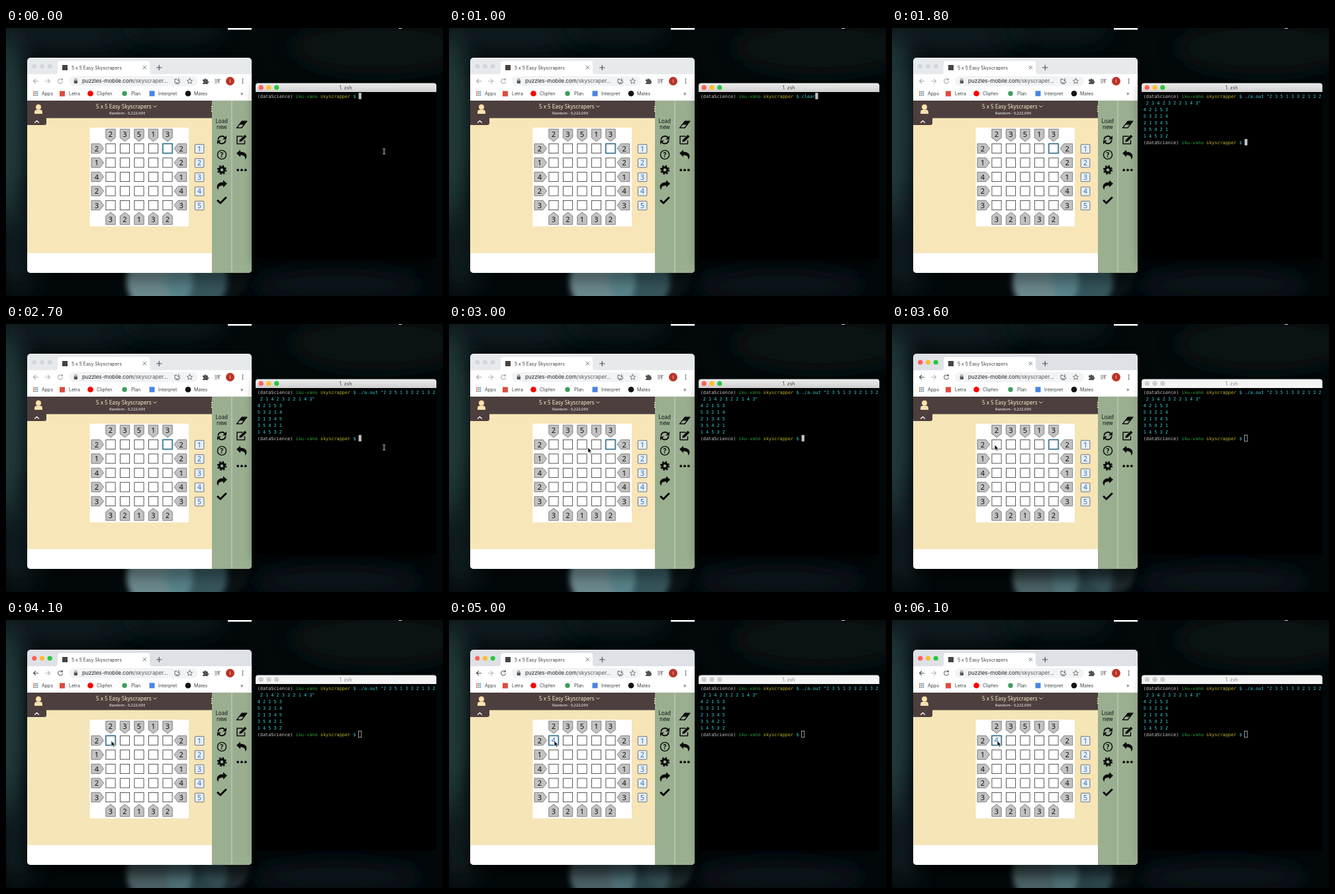
Animation, 660 px wide and 406 px high, one loop 8 s. Source, as an HTML page:

```html
<!DOCTYPE html>
<html lang="en">
<head>
<meta charset="utf-8">
<title>Skyscrapers solver</title>
<style>
html, body { margin: 0; width: 100%; height: 100%; overflow: hidden; background: #03090b; }
svg { display: block; width: 660px; height: 406px; }
text { white-space: pre; }
.ui { font-family: Inter, "Open Sans", sans-serif; }
.page { font-family: "Noto Sans", "Open Sans", sans-serif; }
.mono { font-family: "DejaVu Sans Mono", "Liberation Mono", monospace; font-size: 6.87px; }
.mid { text-anchor: middle; }
.line { fill: none; stroke-linecap: round; stroke-linejoin: round; }
</style>
</head>
<body>
<svg id="stage" viewBox="0 0 660 406" width="660" height="406">
  <defs>
    <filter id="soft" x="-60%" y="-60%" width="220%" height="220%"><feGaussianBlur stdDeviation="16"/></filter>
    <filter id="disc" x="-30%" y="-30%" width="160%" height="160%"><feGaussianBlur stdDeviation="4"/></filter>
    <filter id="shade" x="-20%" y="-20%" width="140%" height="140%"><feGaussianBlur stdDeviation="9"/></filter>
    <linearGradient id="bar" x2="0" y2="1"><stop stop-color="#ebebeb"/><stop offset="1" stop-color="#d0d0d0"/></linearGradient>
    <clipPath id="chromeClip"><rect x="32" y="45" width="339" height="326" rx="5"/></clipPath>
  </defs>
  <g id="wall"></g>
  <g id="chrome"></g>
  <g id="term"></g>
  <g id="mouse"></g>
</svg>
<script>
const LOOP = 8000;
const COLS = [158, 179.5, 201, 222.5, 244];
const ROWS = [182.5, 204, 225.5, 247, 268.5];
const LIGHTS = ['#ff5f57', '#febc2e', '#28c840'];
const CYAN = '#35cfd4';
const CHAR = 4.136;

function add(parent, tag, attrs, content) {
  const el = document.createElementNS('http://www.w3.org/2000/svg', tag);
  for (const key in attrs) el.setAttribute(key, attrs[key]);
  if (content !== undefined) el.textContent = content;
  parent.appendChild(el);
  return el;
}
const byId = id => document.getElementById(id);
const set = (el, key, value) => el.setAttribute(key, value);
const show = (el, on) => set(el, 'visibility', on ? 'visible' : 'hidden');
const shift = (x, y) => `matrix(1 0 0 1 ${x} ${y})`;
const rect = (p, x, y, width, height, fill, more) => add(p, 'rect', { x, y, width, height, fill, ...more });
const circle = (p, cx, cy, r, fill, more) => add(p, 'circle', { cx, cy, r, fill, ...more });
const path = (p, d, fill, more) => add(p, 'path', { d, fill, ...more });
const line = (p, d, stroke, width = 1, more) =>
  add(p, 'path', { d, stroke, 'stroke-width': width, class: 'line', ...more });
const text = (p, x, y, str, size, fill, cls, more) =>
  add(p, 'text', { x, y, 'font-size': size, fill, class: cls, ...more }, str);
const group = (p, x = 0, y = 0) => add(p, 'g', { transform: shift(x, y) });

// Wallpaper
const wall = byId('wall');
rect(wall, 0, 0, 660, 406, '#03090b');
function glow(cx, cy, rx, ry, fill, opacity, filter = 'soft') {
  return add(wall, 'ellipse', { cx, cy, rx, ry, fill, opacity, filter: `url(#${filter})` });
}
glow(0, 150, 38, 150, '#2b4649', 0.75);
glow(90, 10, 110, 30, '#13272b', 0.6);
glow(250, 0, 80, 26, '#0e2024', 0.6);
glow(20, 330, 40, 70, '#14282c', 0.6);
glow(560, 30, 130, 40, '#0b1416', 0.8);
glow(500, 390, 130, 26, '#08171b', 0.8);
const bokeh = [
  glow(232, 384, 50, 50, '#86a9ae', 0.75, 'disc'),
  glow(288, 384, 46, 46, '#4f7f88', 0.6, 'disc')
];
const sideDisc = glow(332, 374, 36, 36, '#4c6467', 0.4, 'disc');
rect(wall, 335, 0, 36, 2.6, '#fff');
rect(wall, 593, 0, 5, 1, '#ddd', { rx: 0.5 });

// Browser window
const chrome = byId('chrome');
const chromeShade = rect(chrome, 30, 54, 343, 332, '#000', { filter: 'url(#shade)' });
const win = add(chrome, 'g', { 'clip-path': 'url(#chromeClip)' });
const strip = rect(win, 32, 45, 339, 326, '#e7eaed');
const chromeLights = [42.8, 54.5, 66.2].map(x => circle(win, x, 58, 3.6));
path(win, 'M74 70Q78 70 78 66V54Q78 50 82 50H213Q217 50 217 54V66Q217 70 221 70Z', '#fff');
rect(win, 32, 70, 339, 40, '#fff');
rect(win, 85, 56, 8, 8, '#444');
text(win, 99, 62.5, '5 x 5 Easy Skyscrapers', 6.9, '#3c4043', 'ui');
line(win, 'M207 57.5l4.6 4.6m0-4.6l-4.6 4.6', '#5f6368', 0.9);
line(win, 'M227.5 60h7.5m-3.75-3.75v7.5', '#4a4d51', 1.1);

const back = line(win, 'M48.5 80.5h-7m3.2-3.2l-3.2 3.2l3.2 3.2', '#aaa', 1.1);
line(win, 'M59.5 80.5h7m-3.2-3.2l3.2 3.2l-3.2 3.2', '#b6b8bb', 1.1);
const reload = line(win, 'M84.8 78.2A3.5 3.5 0 1 0 85.5 81.4M85.3 76.3v2.5h-2.5', '#aaa', 1.1);
rect(win, 95, 73, 195, 15, '#f1f3f4', { rx: 7.5 });
rect(win, 102.7, 79.6, 5.2, 4.4, '#55585c', { rx: 0.6 });
line(win, 'M103.8 79.5v-1.2a1.5 1.5 0 0 1 3 0v1.2', '#55585c', 0.9);
const url = text(win, 115, 83.3, '', 8.1, '#202124', 'ui');
add(url, 'tspan', {}, 'puzzles-mobile.com');
add(url, 'tspan', { fill: '#55585c' }, '/skyscraper...');
line(win, 'M258 77.5h-3v5.4h7.5v-2M256.7 84.6h4M260.7 76.5v3.7m-1.5-1.5l1.5 1.5l1.5-1.5', '#55585c', 0.9);
line(win, 'M277.5 76.3l1.2 2.7l2.9.3l-2.2 1.9l.7 2.9l-2.6-1.5l-2.6 1.5l.7-2.9l-2.2-1.9l2.9-.3z', '#55585c', 0.8);
path(win, 'M297 78h2.5a1.5 1.5 0 1 1 3 0h2.3v2.4a1.5 1.5 0 1 1 0 3v1.6h-7.8v-1.8a1.5 1.5 0 0 0 0-3z', '#505357');
line(win, 'M315.5 78h6M315.5 80.5h6M315.5 83h3.4M321.5 83.5v-5.5h2', '#70747a', 1);
circle(win, 338.5, 80.5, 6.5, '#b9352b');
text(win, 338.5, 83, 'I', 6.5, '#fff', 'ui mid');
[77.5, 80.5, 83.5].forEach(y => circle(win, 357.5, y, 0.9, '#505357'));

for (let i = 0; i < 9; i++)
  rect(win, 41 + i % 3 * 2.7, 95.5 + Math.floor(i / 3) * 2.7, 1.9, 1.9, ['#ea6a5e', '#57a773', '#5d8fe0'][i % 3]);
const label = (x, str) => text(win, x, 101.8, str, 7, '#3c4043', 'ui');
label(54, 'Apps');
label(95, 'Letra');
label(137, 'Clipfen');
label(189, 'Plan');
label(230, 'Interpret');
label(284, 'Mates');
rect(win, 81, 95.5, 8, 8, '#dd4b3e');
circle(win, 127.5, 99.3, 4.3, '#f00');
circle(win, 179, 99.3, 3.7, '#3c9f5a');
rect(win, 216.5, 95.3, 8, 8, '#4a83e6');
circle(win, 275, 99.3, 4.3, '#111');
text(win, 354, 102, '»', 7.5, '#3c4043', 'ui');

// Puzzle page
const page = rect(win, 32, 136, 280, 205, '#f8e6b8');
rect(win, 32, 341, 280, 30, '#fff');
rect(win, 32, 110, 280, 26.5, '#4d3f3d');
path(win, 'M32 136H61V144Q61 147 58 147H32Z', '#4d3f3d');
line(win, 'M43.6 143.3l2.9-2.8l2.9 2.8', '#fff', 1.3);
circle(win, 49, 119.8, 4, '#f9e2ae');
path(win, 'M43 130v-2.2q0-4 4-4h4q4 0 4 4v2.2z', '#f9e2ae');
text(win, 136, 122, '5 x 5 Easy Skyscrapers', 8.05, '#fbeccb', 'page');
line(win, 'M222.7 117.8l2.2 2.2l2.2-2.2', '#fbeccb', 0.9);
text(win, 183, 130.6, 'Random - 5,222,093', 5.8, '#fff', 'page mid');
rect(win, 311, 110, 60, 261, '#9aae90');
rect(win, 340.4, 110, 1.2, 261, '#c4d0bc');
[119, 122.5, 126].forEach(y => circle(win, 310.8, y, 1, '#f6e3b4'));

rect(win, 126.5, 151, 149.5, 149.5, '#fff');
const tagStyle = { stroke: '#747474', 'stroke-width': 0.9, 'stroke-linejoin': 'round' };
function clues(values, place, angle) {
  [...values].forEach((n, i) => {
    const [x, y] = place(i);
    path(win, 'M-8-7.2H5L10.5 0L5 7.2H-8Z', '#c2c2c2',
      { ...tagStyle, transform: `${shift(x, y)} rotate(${angle})` });
    text(win, x, y + 4, n, 11, '#111', 'page mid');
  });
}
clues('23513', i => [COLS[i], 161.2], 90);
clues('32132', i => [COLS[i], 289.7], -90);
clues('21423', i => [137, ROWS[i]], 0);
clues('22143', i => [264.7, ROWS[i]], 180);
for (const y of ROWS)
  for (const x of COLS)
    rect(win, x - 7.1, y - 7.1, 14.2, 14.2, '#fff', { stroke: '#444', 'stroke-width': 0.9 });
ROWS.forEach((y, i) => {
  rect(win, 285.3, y - 6.2, 13.6, 13.4, '#e6eef5', { stroke: '#667', 'stroke-width': 0.9, rx: 0.8 });
  text(win, 292.1, y + 4.4, i + 1, 10.5, '#2f73b8', 'page mid');
});
const ring = group(win);
rect(ring, -8, -8, 16, 16, 'none', { stroke: '#a7cde0', 'stroke-width': 1.2, rx: 1 });
rect(ring, -7, -7, 14, 14, '#fff', { stroke: '#2f6680', 'stroke-width': 1.3 });
const answer = text(win, 157.6, 186.4, '4', 11, '#1f66c4', 'page mid');

// Side tools
text(win, 325.8, 144, 'Load', 8, '#111', 'page mid');
text(win, 325.8, 153.4, 'new', 8, '#111', 'page mid');
const tool = (x, y) => group(win, x, y);
const INK = '#0c0c0c';
const refresh = tool(326, 169.5);
for (const a of [0, 180]) {
  const half = add(refresh, 'g', { transform: `rotate(${a})` });
  line(half, 'M-5.6-1A5.7 5.7 0 0 1 4.2-3.8', INK, 1.9);
  path(half, 'M7-6.6V-.8H1.2Z', INK);
}
const help = tool(326, 192);
circle(help, 0, 0, 6.6, 'none', { stroke: INK, 'stroke-width': 1.4 });
text(help, 0, 3.6, '?', 10, INK, 'page mid', { 'font-weight': 700 });
const gear = tool(326, 215);
circle(gear, 0, 0, 3.9, 'none', { stroke: INK, 'stroke-width': 3.2 });
circle(gear, 0, 0, 5.9, 'none', { stroke: INK, 'stroke-width': 2.6, 'stroke-dasharray': 5.9 * Math.PI / 8 });
const turn = 'M8-2.2L2-7.5V-4.4Q-7.5-4-7.5 3Q-7.5 5.6-5.2 7Q-6.5.6 2 .4V3.4Z';
path(tool(326, 238), turn, INK);
path(tool(356, 192), turn, INK, { transform: 'scale(-1 1)' });
line(tool(326, 261), 'M-6 .6L-2.2 4.2L6-4', INK, 3, { 'stroke-linecap': 'butt', 'stroke-linejoin': 'miter' });
const eraser = tool(356, 146.5);
path(eraser, 'M-8 5L0-5.5H8.2L.3 5Z', INK, { stroke: INK, 'stroke-width': 1, 'stroke-linejoin': 'round' });
path(eraser, 'M-6 4L-3 0H2.6L-.4 4Z', '#9aae90');
const edit = tool(355.5, 169);
line(edit, 'M1.5-5H-6.5V6.5H5V1.5', INK, 1.5);
path(edit, 'M-3.3 3.6L-2.6.4L5.2-7.2L8-4.4L.2 3Z', INK);
[-5.8, 0, 5.8].forEach(x => circle(win, 356 + x, 215.2, 1.9, INK));

// Terminal window
const term = byId('term');
const termShade = rect(term, 378, 90, 271, 268, '#000', { filter: 'url(#shade)' });
rect(term, 377, 83.5, 273, 265.5, '#000', { rx: 4 });
const bar = path(term, 'M377 97V87.5Q377 83.5 381 83.5H646Q650 83.5 650 87.5V97Z', 'url(#bar)');
const termLights = [385.2, 397, 408.7].map(x => circle(term, x, 90.2, 3.6));
const termTitle = text(term, 513, 92.8, '1. zsh', 7.2, '#444', 'ui mid');
const rowY = row => 106 + row * 10;
const print = (row, col, str, fill = CYAN) =>
  text(term, 379.7 + col * CHAR, rowY(row), str, 6.87, fill, 'mono');
function prompt(row) {
  return [
    print(row, 0, '(dataScience)', '#c9c9c9'),
    print(row, 14, 'iku-vano', '#2fa836'),
    print(row, 23, 'skyscrapper', '#bdb62c'),
    print(row, 35, '$')
  ];
}
prompt(0);
const command = print(0, 37, '');
const wrapped = print(1, 0, ' 2 1 4 2 3 2 2 1 4 3"');
const output = ['4 2 1 5 3', '5 3 2 1 4', '2 1 3 4 5', '3 5 4 2 1', '1 4 5 3 2']
  .map((str, i) => print(i + 2, 0, str)).concat(prompt(7));
const caret = rect(term, 0, 0, 4.2, 9.6, '#c4c4c4', { 'stroke-width': 0.8 });

// Pointers
const mouse = byId('mouse');
const beam = group(mouse);
line(beam, 'M-1.6-4Q0-4 0-2.8Q0-4 1.6-4M0-2.8V2.8M-1.6 4Q0 4 0 2.8Q0 4 1.6 4', '#ddd', 0.9);
const arrow = group(mouse);
path(arrow, 'M0 0V8.2L1.9 6.5L3.2 9.4L4.7 8.7L3.4 5.9H6Z', '#000',
  { stroke: '#fff', 'stroke-width': 0.7, 'stroke-linejoin': 'round' });

function pointerAt(t) {
  if (t < 2700) return [571, 187];
  if (t < 3600) {
    const p = (t - 2700) / 900;
    return [155 + 416 * (1 - p) ** 5, 187 - 4 * Math.max(0, (p - 1 / 3) * 1.5)];
  }
  return [155 + 4 * Math.min(1, (t - 3600) / 400), 183];
}

function paintLights(dots, on, off) {
  dots.forEach((dot, i) => set(dot, 'fill', on ? LIGHTS[i] : off));
}

function update(t) {
  const browsing = t >= 3600;
  paintLights(chromeLights, browsing, '#d3d6da');
  paintLights(termLights, !browsing, '#cdcdcd');
  set(strip, 'fill', browsing ? '#dee1e6' : '#e7eaed');
  set(page, 'fill', browsing ? '#f5e5b7' : '#f8e6b8');
  set(back, 'stroke', browsing ? '#4a4d51' : '#a4a7ab');
  set(reload, 'stroke', browsing ? '#5f6368' : '#a4a7ab');
  set(bar, 'fill', browsing ? '#f4f4f4' : 'url(#bar)');
  set(termTitle, 'fill', browsing ? '#8a8a8a' : '#444');
  set(chromeShade, 'opacity', browsing ? 0.6 : 0.3);
  set(termShade, 'opacity', browsing ? 0.3 : 0.6);
  set(bokeh[0], 'opacity', browsing ? 0.55 : 0.8);
  set(bokeh[1], 'opacity', browsing ? 0.5 : 0.65);
  set(sideDisc, 'opacity', browsing && t < 5700 ? 0.4 : 0.12);

  command.textContent = t < 800 ? '' : t < 1400 ? 'clear' : './a.out "2 3 5 1 3 3 2 1 3 2';
  show(wrapped, t >= 1400);
  output.forEach(el => show(el, t >= 1800));
  const [row, col] = t < 800 ? [0, 37] : t < 1400 ? [0, 42] : t < 1800 ? [1, 21] : [7, 37];
  set(caret, 'x', 379.5 + col * CHAR);
  set(caret, 'y', rowY(row) - 7.8);
  set(caret, 'fill', browsing ? 'none' : '#c4c4c4');
  set(caret, 'stroke', browsing ? '#c4c4c4' : 'none');

  const picked = t >= 4000;
  set(ring, 'transform', shift(picked ? COLS[0] : COLS[4], ROWS[0]));
  show(answer, t >= 5000);

  const [x, y] = pointerAt(t);
  const inTerm = x > 377;
  const awake = t < 800 || t >= 2700;
  show(beam, awake && inTerm);
  show(arrow, awake && !inTerm);
  for (const el of [beam, arrow]) set(el, 'transform', shift(x, y));
}

const start = performance.now();
function tick() {
  const t = (performance.now() - start) % LOOP;
  update(Math.floor(t / 100) * 100);
  requestAnimationFrame(tick);
}
update(0);
requestAnimationFrame(tick);
</script>
</body>
</html>
```
